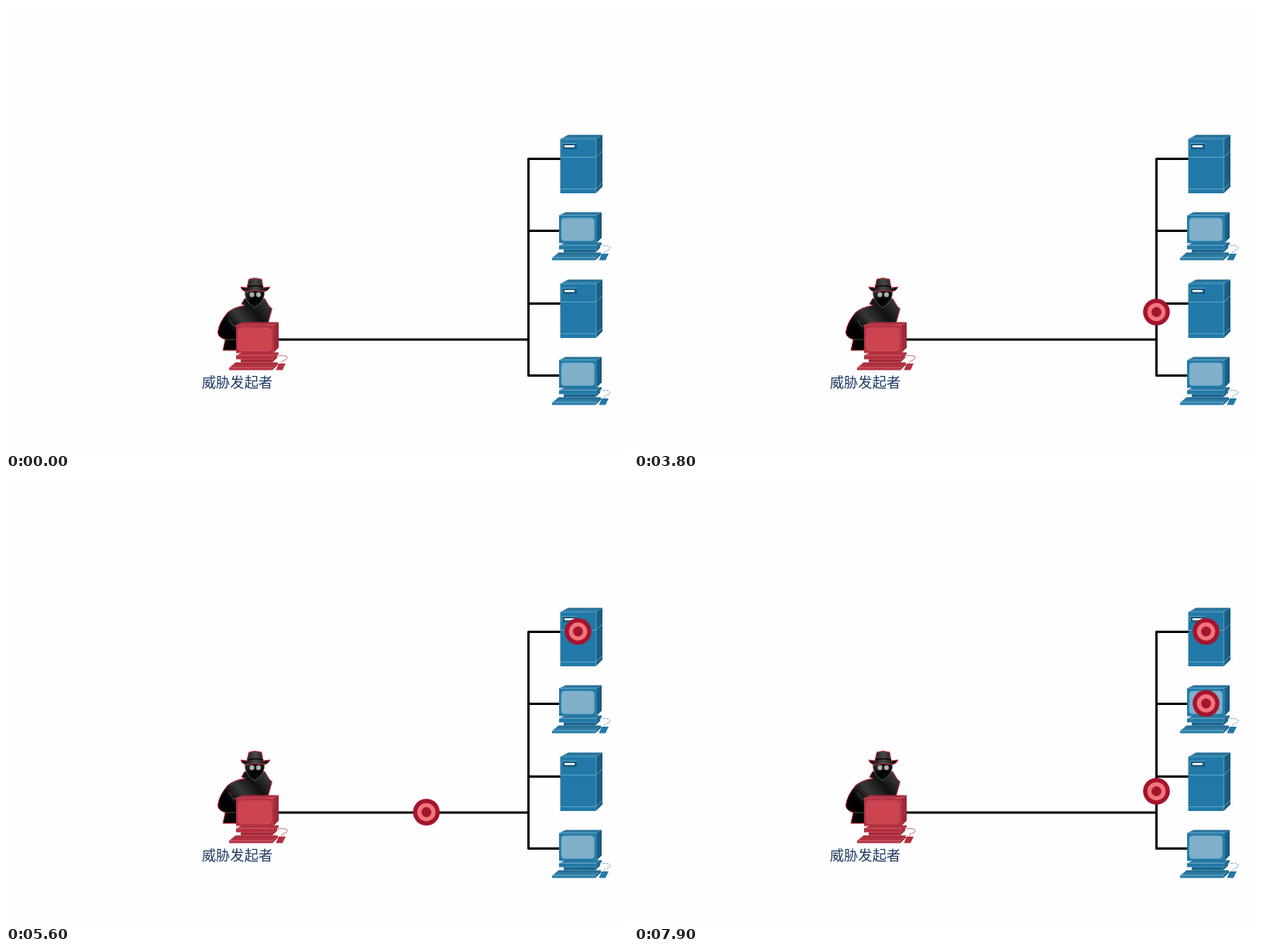
An HTML page with a canvas that plays this animation: 803x575 px, repeating every 8000 ms.

```html
<!DOCTYPE html>
<html lang="zh">
<head>
<meta charset="utf-8">
<style>
html, body { margin: 0; width: 100%; height: 100%; overflow: hidden; background: #fefefe; }
canvas { display: block; }
</style>
</head>
<body>
<canvas id="stage" width="803" height="575"></canvas>
<script>
const ctx = document.getElementById('stage').getContext('2d');
const LOOP = 8000, STEP = 100;
const HOME = { x: 321.5, y: 430.5 }, BUS = 674.5, END = 738.5;
const rowY = i => Math.floor(197 + 93.5 * i) + 0.5;

const BLUE = { front: '#2279a7', top: '#3f8db5', side: '#17597e', edge: '#5fa3c6', screen: '#80afca', dark: '#1b648c' };
const RED = { front: '#b5303f', top: '#bb3a48', side: '#9c2838', edge: '#cb5562', screen: '#cb4450', dark: '#a52838' };

function shape(d, fill, stroke, width = 1) {
  const path = new Path2D(d);
  if (fill) { ctx.fillStyle = fill; ctx.fill(path); }
  if (stroke) { ctx.strokeStyle = stroke; ctx.lineWidth = width; ctx.stroke(path); }
}

function disc(x, y, r, color) {
  ctx.beginPath();
  ctx.arc(x, y, r, 0, 2 * Math.PI);
  ctx.fillStyle = color;
  ctx.fill();
}

function fade(x0, y0, x1, y1, ...colors) {
  const g = ctx.createLinearGradient(x0, y0, x1, y1);
  colors.forEach((c, i) => g.addColorStop(i / (colors.length - 1), c));
  return g;
}

function at(x, y, draw) {
  ctx.save();
  ctx.translate(x, y);
  draw();
  ctx.restore();
}

// Front face at x, y with a top and a right side receding by dx, dy
function box(c, x, y, w, h, dx, dy) {
  const r = x + w, b = y + h;
  shape(`M${x} ${y}H${r}V${b}H${x}Z`, c.front);
  shape(`M${x} ${y}L${x + dx * 1.2} ${y - dy}H${r + dx}L${r} ${y}Z`, fade(0, y - dy, 0, y, c.dark, c.top));
  shape(`M${r} ${y}L${r + dx} ${y - dy}V${b - dx}L${r} ${b}Z`, fade(r, 0, r + dx, 0, c.dark, c.side));
  shape(`M${x} ${y}H${r}V${b}`, null, c.edge, 0.6);
}

function server() {
  const c = BLUE;
  box(c, 0.5, 6, 46, 70, 8.5, 5.5);
  for (const y of [29.5, 70.5]) shape(`M0.5 ${y}H46.5L55 ${y - 8}`, null, c.edge);
  shape('M3 11H22V19H3Z', c.side);
  shape('M3 19V11.5H22', null, c.edge);
  shape('M6 14H19V16.5H6Z', '#fff');
}

function computer(c, dash) {
  box(c, 0, 59, 56, 3, 7, 7);
  box({ ...c, front: c.dark }, 15, 48, 41, 4, 6, 4);
  box(c, 9, 43, 48, 5, 7, 4);
  box(c, 9, 4, 48, 36, 7, 4);
  ctx.beginPath();
  ctx.roundRect(12, 7.5, 42.5, 29.5, 4);
  ctx.fillStyle = c.screen;
  ctx.fill();
  ctx.strokeStyle = c.edge;
  ctx.lineWidth = 0.8;
  ctx.stroke();
  ctx.setLineDash(dash);
  shape('M61 44Q67 42 74 44Q77 47 72 49Q66 51 68 53', null, c.front, 0.7);
  ctx.setLineDash([]);
  shape('M60.5 62L64 53.5H73L69 62Z', c.front);
}

function person() {
  const outline = '#d9343c';
  ctx.lineJoin = 'round';
  // coat with raised collar
  shape('M308 387Q294 389 286 396Q275 409 273.5 421Q273 428 283 431L280 445H300L338 411L343.5 391L340 388L334 378H308L304 385Z',
    fade(278, 436, 340, 386, '#080808', '#000', '#383838', '#111', '#3a3a3a'), outline);
  shape('M288 405L294 414L307 409M283 431H298', null, '#666', 0.7);
  // head
  shape('M309 366Q306 381 321 390Q336 381 333 366Z', fade(309, 368, 333, 388, '#333', '#000', '#181818'), '#777', 0.7);
  // hat
  shape('M303 363L311 364L313.5 353Q321 350 330 353L332 364L341 363Q338 369 332 369Q321 366 311 369Q305 369 303 363Z',
    fade(306, 360, 338, 360, '#0c0c0c', '#484848', '#0c0c0c'), outline);
  shape('M312 363Q321 360 332 363', null, '#000', 1.5);
  for (const x of [317.5, 326]) {
    disc(x, 373, 3.6, '#444');
    disc(x, 373, 2.9, '#b0b0b0');
  }
  ctx.lineJoin = 'miter';
}

function wires() {
  ctx.lineJoin = 'round';
  shape(`M345 431H${BUS}M718 ${rowY(0)}H${BUS}V${rowY(3)}H718`, null, '#000', 3);
  for (const i of [1, 2]) shape(`M${BUS} ${rowY(i)}H718`, null, '#000', 3);
  ctx.lineJoin = 'miter';
}

function scene() {
  ctx.fillStyle = '#fefefe';
  ctx.fillRect(0, 0, 803, 575);
  wires();
  for (const y of [166, 353]) {
    at(715, y, server);
    at(705, y + 100.5, () => computer(BLUE, [3, 1.5]));
  }
  person();
  at(288, 408.5, () => computer(RED, []));
  ctx.fillStyle = '#1f3a63';
  ctx.font = '300 18.3px "Noto Sans CJK SC", "Noto Sans CJK", sans-serif';
  ctx.fillText('威胁发起者', 252.8, 493);
}

function target(x, y) {
  disc(x, y, 17.3, '#a5142e');
  disc(x, y, 11.8, '#f0757b');
  disc(x, y, 6.4, '#a5142e');
}

const PROBES = [
  { row: 0, start: 2500, time: 2450 },
  { row: 1, start: 5050, time: 1600 },
  { row: 2, start: 6900, time: 1315 }
];

// Along the main wire, up the bus, then out to the device
function probe({ row, start, time }, t) {
  if (t < start) return;
  const y = rowY(row) - 0.5;
  const across = BUS - HOME.x, up = HOME.y - y, out = END - BUS;
  const p = Math.min(1, (t - start) / time);
  const d = (across + up + out) * (1 - (1 - p) ** 1.2);
  target(
    HOME.x + Math.min(d, across) + Math.max(0, d - across - up),
    HOME.y - Math.min(Math.max(0, d - across), up)
  );
}

// Two short flashes, then steady until the first probe leaves
function blink(t) {
  const n = Math.floor((t - 1160) / 170);
  if (n >= 0 && Math.min(n, 4) % 2 === 0) target(HOME.x, HOME.y);
}

function draw(t) {
  scene();
  if (t < PROBES[0].start) blink(t);
  PROBES.forEach(p => probe(p, t));
}

const begin = performance.now();
function tick() {
  const t = (performance.now() - begin) % LOOP;
  draw(Math.floor(t / STEP) * STEP);
  requestAnimationFrame(tick);
}
tick();
</script>
</body>
</html>
```
